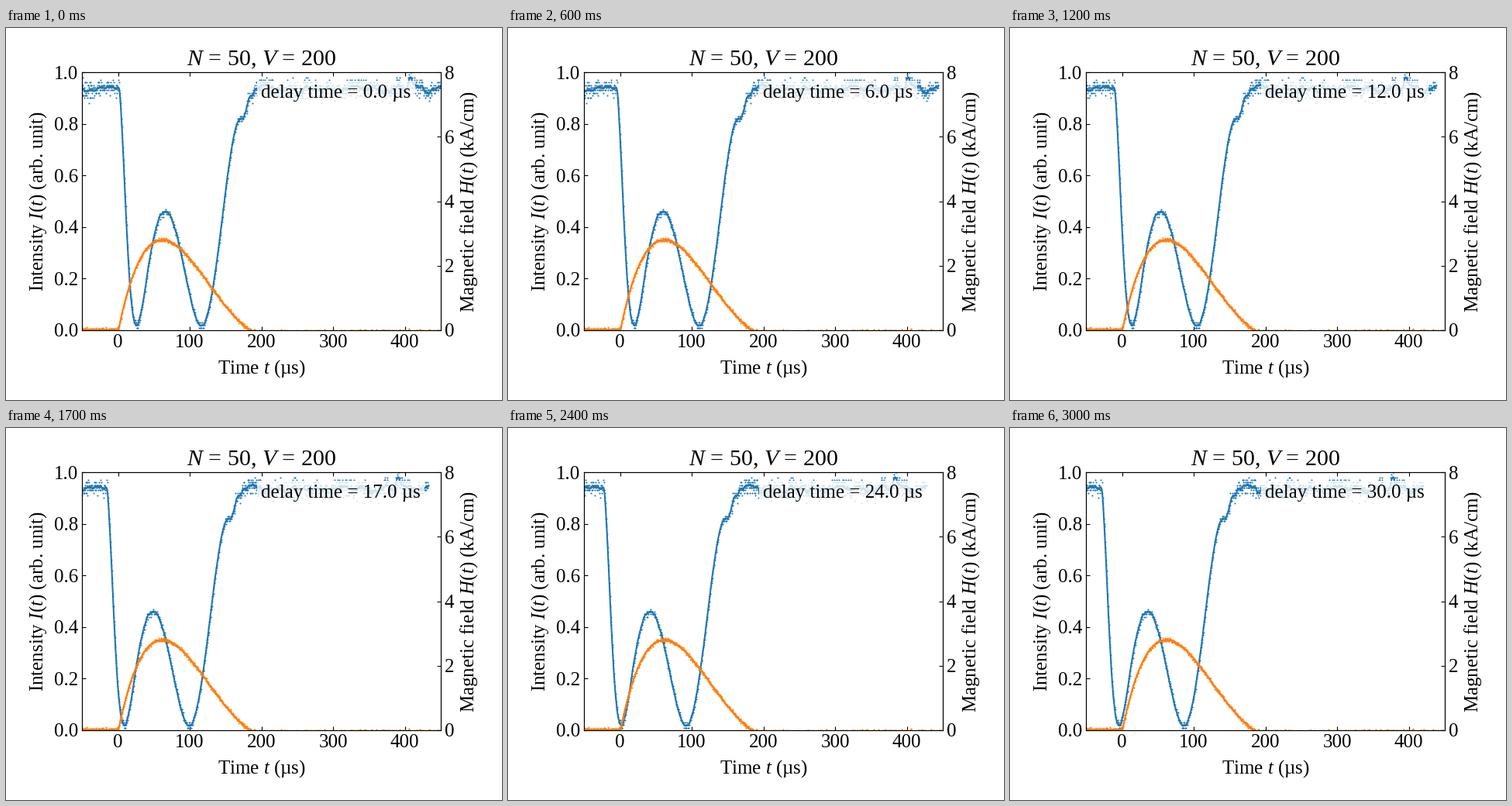
A matplotlib script that plays this animation: 640 by 480 pixels, repeating every 3100 ms.

```python
import numpy as np
import matplotlib.pyplot as plt
from matplotlib.animation import FuncAnimation

plt.rcParams.update({
    "font.family": "Liberation Serif",
    "font.size": 18,
    "mathtext.fontset": "custom",
    "mathtext.rm": "Liberation Serif",
    "mathtext.it": "Liberation Serif:italic",
    "xtick.direction": "in",
    "ytick.direction": "in",
    "xtick.top": True,
})

FRAMES = 31
PULSE_START, PULSE_LENGTH, PEAK_FIELD = 0.5, 193, 2.8
I_MIN, I_MAX = 0.018, 0.935
PHASE_PER_FIELD = 0.835
rng = np.random.default_rng(4)


def pulse(time):
    """Skewed field pulse, zero outside its length."""
    u = np.clip((time - PULSE_START) / PULSE_LENGTH, 0, 1)
    return PEAK_FIELD / 0.1326 * u * (1 - u) ** 1.8 / (1 + 0.641 * u)


def smoothstep(x):
    x = np.clip(x, 0, 1)
    return x * x * (3 - 2 * x)


def bump(x, center, width):
    return np.exp(-((x - center) / width) ** 2)


def moving_mean(values, width):
    padded = np.pad(values, width // 2, mode="edge")
    return np.convolve(padded, np.ones(width) / width, "valid")


def draw_series(ax, x, raw, line, color):
    dots, = ax.plot(x, raw, "o", ms=1, mew=0.4, color=color)
    curve, = ax.plot(x, line, lw=1.5, color=color)
    return dots, curve


t = np.linspace(-50, 450, 1251)

# Field: small positive offset before the pulse, slightly negative after it
offset = np.where(t < 100, 0.02 * (t < 0), -0.06 + 8e-5 * (t - 200))
field = pulse(t) + offset * (1 - smoothstep(pulse(t) / 0.3))
raw_h = np.round(field + rng.normal(0, 0.03, t.size), 2)

# Intensity: cos^2 of a phase that follows the field with a growing lag
lag = 4 * smoothstep(t / 55)
phase = PHASE_PER_FIELD * pulse(t - lag)
intensity = I_MIN + (I_MAX - I_MIN) * np.cos(phase) ** 2 - 0.07 * bump(t, 176, 8)

plateau = smoothstep((intensity - 0.8) / 0.12)
wiggle = (0.007 * np.sin(t / 4.7 + 1) + 0.005 * np.sin(t / 11 + 2)
          + 0.018 * bump(t, -12, 5) + 0.015 * bump(t, 201, 5)
          + 0.035 * bump(t, 407, 4))
noise = rng.normal(size=t.size) * (0.007 + 0.011 * plateau)
clean = intensity + wiggle * plateau
raw_i = np.round(clean + noise, 2)
line_i = clean + moving_mean(noise, 11)

fig, ax = plt.subplots(figsize=(6.4, 4.8), dpi=100)
fig.subplots_adjust(left=0.1535, right=0.8765, bottom=0.1875, top=0.881)
ax_h = ax.twinx()

series = draw_series(ax, t, raw_i, line_i, "tab:blue")
draw_series(ax_h, t, raw_h, field, "tab:orange")

ax.set(xlim=(-50, 450), ylim=(0, 1), xticks=range(0, 401, 100),
       yticks=np.linspace(0, 1, 6), title="$N$ = 50, $V$ = 200")
ax.set_xlabel("Time $t$ (µs)", labelpad=7)
ax.set_ylabel("Intensity $I(t)$ (arb. unit)", labelpad=5.3)
ax_h.set(ylim=(0, 8), yticks=range(0, 9, 2),
         ylabel="Magnetic field $H(t)$ (kA/cm)")
label = ax.text(199.5, 0.9, "",
                bbox=dict(facecolor="white", edgecolor="none", alpha=0.8))


def update(i):
    for artist in series:
        artist.set_xdata(t - i)
    label.set_text(f"delay time = {i:.1f} µs")
    return *series, label


anim = FuncAnimation(fig, update, frames=FRAMES, interval=100, repeat=True)
plt.show()
```
